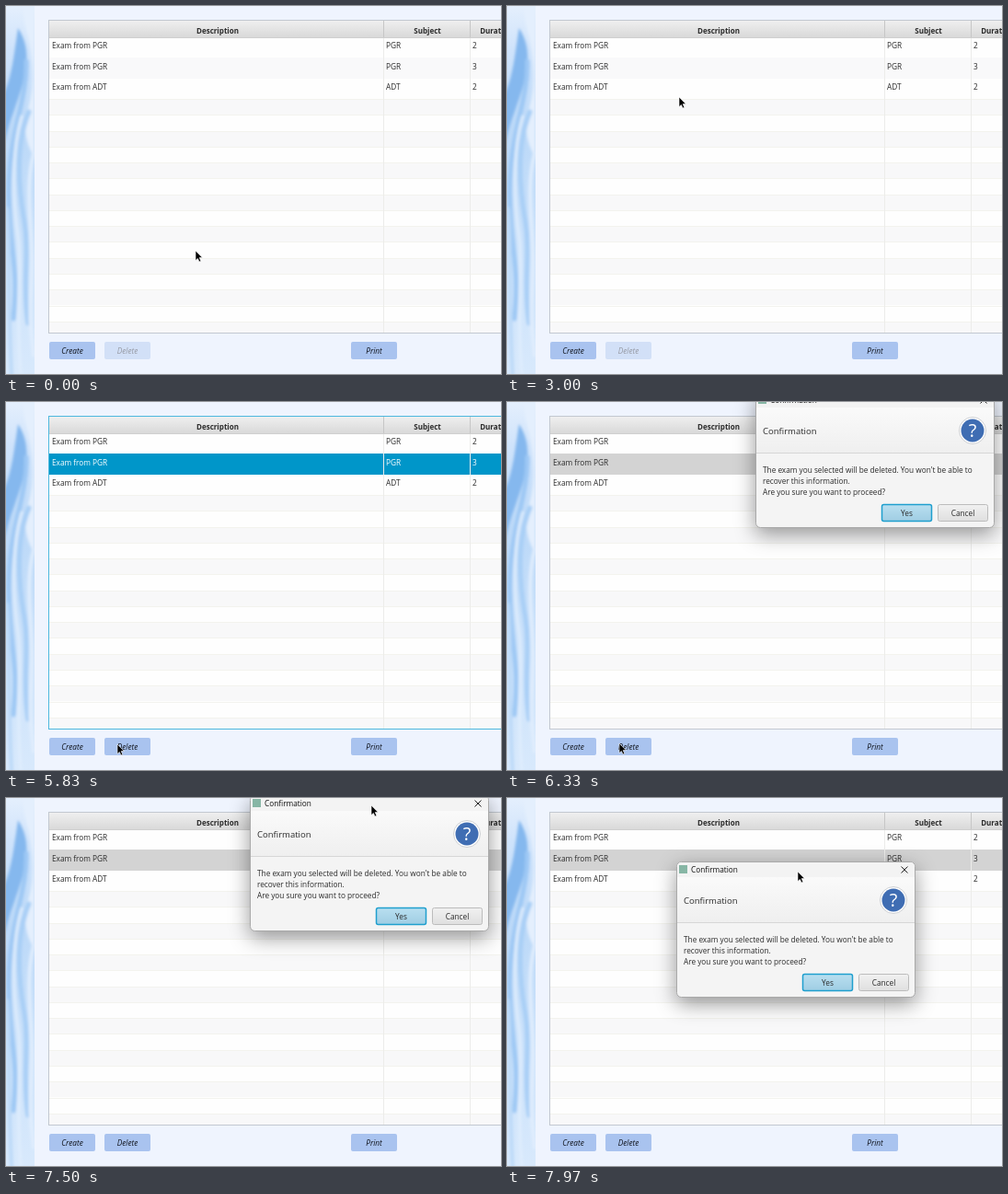
These frames come from a looping animation (538x400 px, 8 s). An HTML page:

```html
<!DOCTYPE html>
<html lang="en">
<head>
<meta charset="utf-8">
<title>Exam list</title>
<style>
  html, body { margin: 0; width: 100%; height: 100%; overflow: hidden; background: #eff4fe; }
  svg { display: block; width: 538px; height: 400px; font: 8.25px "Open Sans", "Noto Sans", sans-serif; fill: #2b2b2b; }
  .head { font-weight: 700; font-size: 8px; text-anchor: middle; }
  .btn { font-style: italic; text-anchor: middle; fill: #10141c; }
  .mid { text-anchor: middle; }
  #win { filter: drop-shadow(0 7px 11px rgba(0, 0, 0, .4)); }
</style>
</head>
<body>
<svg viewBox="0 0 538 400">
  <defs>
    <linearGradient id="marble" x2="0" y2="1">
      <stop offset="0" stop-color="#e4effd"/><stop offset=".12" stop-color="#cfe3fb"/>
      <stop offset=".35" stop-color="#bcd9f8"/><stop offset=".6" stop-color="#c8e0fa"/>
      <stop offset="1" stop-color="#d8e9fc"/>
    </linearGradient>
    <linearGradient id="headFill" x2="0" y2="1">
      <stop offset="0" stop-color="#efefef"/><stop offset="1" stop-color="#d9d9d9"/>
    </linearGradient>
    <linearGradient id="panel" x2="0" y2="1">
      <stop offset="0" stop-color="#fafafa"/><stop offset="1" stop-color="#efefef"/>
    </linearGradient>
    <linearGradient id="yesFill" x2="0" y2="1">
      <stop offset="0" stop-color="#b9dff0"/><stop offset="1" stop-color="#9fcde3"/>
    </linearGradient>
    <linearGradient id="cancelFill" x2="0" y2="1">
      <stop offset="0" stop-color="#f1f1f1"/><stop offset="1" stop-color="#dfdfdf"/>
    </linearGradient>
    <clipPath id="strip"><rect width="31" height="400"/></clipPath>
    <filter id="soft"><feGaussianBlur stdDeviation="1.6"/></filter>
  </defs>

  <rect width="538" height="400" fill="#eff4fe"/>
  <g clip-path="url(#strip)">
    <rect width="31" height="400" fill="url(#marble)"/>
    <g filter="url(#soft)" fill="none" stroke-linecap="round">
      <path d="M13 24C24 40 25 60 18 85S5 120 -2 150V95C7 75 9 50 13 24Z" fill="#85b8ee"/>
      <path d="M20 18C32 60 30 90 24 112S22 150 31 165V0H18Z" fill="#e4effd"/>
      <path d="M22 60C24 100 2 140 3 205S14 280 8 340" stroke="#9dc8f4" stroke-width="5"/>
      <path d="M25 115C10 150 14 200 20 235S17 300 24 345" stroke="#a9cff6" stroke-width="5"/>
      <path d="M17 120C5 160 8 215 13 250S10 330 16 400" stroke="#dfedfd" stroke-width="3"/>
      <path d="M30 160C20 200 29 240 28 285S24 330 30 380" stroke="#e0edfd" stroke-width="4"/>
      <path d="M1 220C5 270 2 320 6 400" stroke="#bddaf8" stroke-width="4"/>
    </g>
  </g>

  <g id="table"></g>
  <g id="buttons"></g>

  <g id="win">
    <rect x=".5" y=".5" width="259" height="147" rx="5" fill="#f4f4f4" stroke="#a9a9a9"/>
    <path d="M1 17V6Q1 1 6 1H254Q259 1 259 6V17Z" fill="#f3f3f3"/>
    <path d="M1 17H259V66H1Z" fill="url(#panel)"/>
    <path d="M1 66.5H259" stroke="#d6d6d6"/>
    <rect x="3" y="4" width="9" height="9" fill="#87b6a5"/>
    <text x="16" y="12" fill="#111">Confirmation</text>
    <path d="M244.5 5.5l7 7m0-7l-7 7" stroke="#222"/>
    <text x="8" y="46" font-size="9.5">Confirmation</text>
    <circle cx="236" cy="42" r="14.5" fill="#fff" stroke="#c3c6c9" stroke-width=".8"/>
    <circle cx="236" cy="42" r="12.5" fill="#3f6db3"/>
    <text class="mid" x="236" y="49" font-size="20" style="fill:#fff">?</text>
    <text x="8" y="88">The exam you selected will be deleted. You won't be able to</text>
    <text x="8" y="100">recover this information.</text>
    <text x="8" y="112">Are you sure you want to proceed?</text>
    <rect x="137.5" y="122.5" width="54" height="18" rx="2" fill="url(#yesFill)" stroke="#1f9fce" stroke-width="1.5"/>
    <text class="mid" x="164.5" y="134.5">Yes</text>
    <rect x="198.5" y="122.5" width="54" height="18" rx="2" fill="url(#cancelFill)" stroke="#bcbcbc"/>
    <text class="mid" x="225.5" y="134.5">Cancel</text>
  </g>

  <path id="cursor" d="M0 0V10.6L2.4 8.4L4 12L5.8 11.2L4.2 7.6H7.4Z" fill="#000" stroke="#fff" stroke-width=".6"/>
</svg>
<script>
const $ = id => document.getElementById(id);
const rect = (x, y, w, h, fill, more = "") =>
  `<rect x="${x}" y="${y}" width="${w}" height="${h}" fill="${fill}" ${more}/>`;
const text = (x, y, s, more = "") => `<text x="${x}" y="${y}" ${more}>${s}</text>`;

const LOOP = 8000, SELECT = 4250, OPEN = 6030, GRAB = 7270;
const GRIP = [132, 10.5], HOME = [270, -11];

const exams = [["PGR", 2], ["PGR", 3], ["ADT", 2]];

function buildTable() {
  let out = rect(47, 16, 500, 339, "#fefefe") + rect(47, 16, 500, 18, "url(#headFill)");
  out += rect(47, 56, 500, 23, "#f9f9fa", 'id="row"');
  for (let i = 0; i < 15; i++) {
    const y = Math.round(101 + i * 17.27);
    if (i % 2 == 0) out += rect(47, y, 500, Math.min(17, 355 - y), "#f8f8f9");
    out += rect(47, y, 500, 1, "#f3f3ee");
  }
  for (const x of [410, 504]) out += rect(x, 16, 1, 18, "#c6c6c6") + rect(x, 34, 1, 321, "#ececea");
  out += rect(47, 34, 500, 1, "#cfcfcf");
  out += text(230, 29.5, "Description", 'class="head"') + text(458, 29.5, "Subject", 'class="head"')
       + text(533, 29.5, "Duration", 'class="head"');
  exams.forEach(([subject, hours], i) => {
    const y = [46, 68.5, 90.5][i];
    out += `<g id="exam${i}">` + text(50, y, "Exam from " + subject)
         + text(413, y, subject) + text(507, y, hours) + "</g>";
  });
  $("table").innerHTML = out + rect(46.5, 15.5, 510, 340, "none", 'id="frame"');
}

function buildButtons() {
  $("buttons").innerHTML = [[47, "Create"], [107, "Delete"], [375, "Print"]].map(([x, label]) =>
    `<g id="${label}">` + rect(x, 365, 50, 19, "#a9c3ef", 'rx="2"')
    + text(x + 25, 377.5, label, 'class="btn"') + "</g>").join("");
}

// time, x, y of the pointer tip; equal neighbours are pauses
const path = [
  [0, 206, 266], [370, 204, 230], [900, 204, 230], [1170, 200, 195], [1970, 200, 195],
  [2530, 187, 99], [2970, 187, 99], [3170, 184, 92], [3540, 184, 92], [4230, 115, 73],
  [4500, 115, 73], [4530, 118, 70], [4670, 118, 70], [4730, 116, 71], [4970, 116, 71],
  [5800, 117, 372], [5830, 121, 372], [6300, 121, 372], [6630, 207, 304], [7230, 402, 0],
  [GRAB, 402, 0], [7500, 397, 7.5], [7800, 397, 7.5], [7970, 317, 79.5], [8010, 290, 104]
];

// Speed along axis k at a knot, so that moves run through it; zero at pauses
function slope(i, k) {
  const a = path[i - 1], p = path[i], b = path[i + 1];
  const still = q => !q || (q[1] == p[1] && q[2] == p[2]);
  return still(a) || still(b) ? 0 : (b[k] - a[k]) / (b[0] - a[0]);
}

function pointer(t) {
  const i = path.findIndex(p => p[0] > t), a = path[i - 1], b = path[i];
  const d = b[0] - a[0], u = (t - a[0]) / d, v = 1 - u;
  return [1, 2].map(k => a[k] + (b[k] - a[k]) * u * u * (3 - 2 * u)
    + d * u * v * (slope(i - 1, k) * v - slope(i, k) * u));
}

function draw(t) {
  const [x, y] = pointer(t);
  const selected = t >= SELECT, open = t >= OPEN, focused = selected && !open;
  $("cursor").setAttribute("transform", `translate(${Math.round(x)} ${Math.round(y)})`);
  $("row").setAttribute("fill", focused ? "#0096c9" : open ? "#d3d3d3" : "#f9f9fa");
  $("exam1").setAttribute("fill", focused ? "#fff" : "#2b2b2b");
  $("frame").setAttribute("stroke", focused ? "#4db8de" : "#c2c8d0");
  $("Delete").setAttribute("opacity", selected ? 1 : .4);

  const [wx, wy] = t < GRAB ? HOME : [x - GRIP[0], y - GRIP[1]].map(Math.round);
  $("win").setAttribute("transform", `translate(${wx} ${wy})`);
  $("win").setAttribute("opacity", Math.max(0, Math.min(1, (t - OPEN) / 120)));
}

buildTable();
buildButtons();
const start = performance.now();
function tick() {
  draw((performance.now() - start) % LOOP);
  requestAnimationFrame(tick);
}
tick();
</script>
</body>
</html>
```
